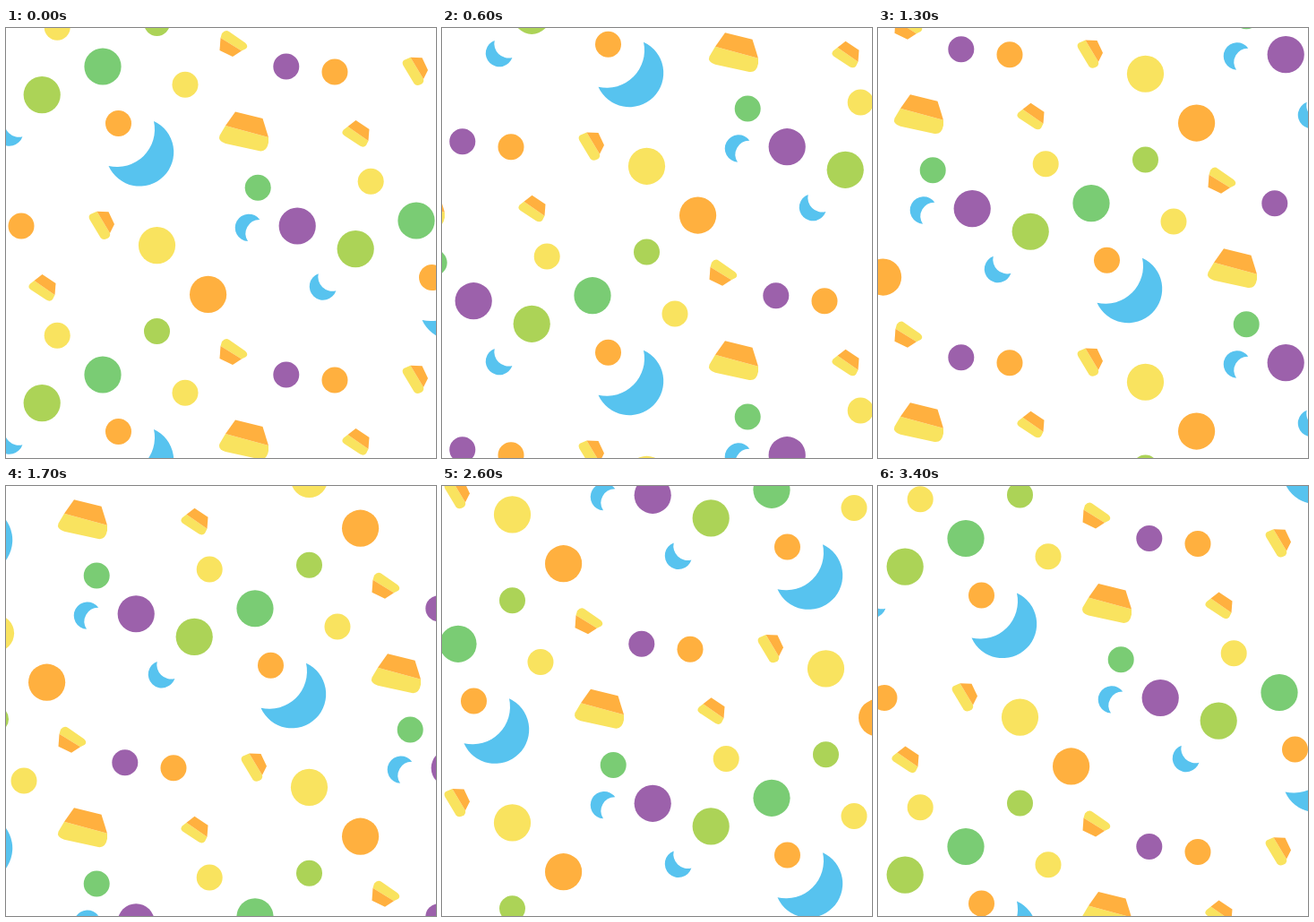
An HTML page that plays this animation: 480 by 480 pixels, repeating every 3500 ms.

```html
<!DOCTYPE html>
<html lang="en">
<head>
<meta charset="utf-8">
<title>Drifting sweets</title>
<style>
  html, body { margin: 0; width: 100%; height: 100%; overflow: hidden; background: #fff; }
  svg { display: block; width: 100%; height: 100%; }
</style>
</head>
<body>
<svg viewBox="0 0 480 480">
  <defs><g id="motif"></g></defs>
  <g id="field"></g>
</svg>
<script>
const GREEN = '#7acc74', LIME = '#acd357', YELLOW = '#f9e35f';
const ORANGE = '#ffb03f', PURPLE = '#9c61ab', BLUE = '#57c3ef';
const TILE_W = 350, TILE_H = 344;
const STEP_MS = 100, STEPS = 35, STEP_X = 10, STEP_Y = 14.72;
const BIG = 20.6, SMALL = 14.5;

const motif = document.getElementById('motif');
const field = document.getElementById('field');

function add(parent, tag, attrs) {
  const el = document.createElementNS('http://www.w3.org/2000/svg', tag);
  for (const key in attrs) el.setAttribute(key, attrs[key]);
  parent.appendChild(el);
}

const dot = (cx, cy, r, fill) => add(motif, 'circle', { cx, cy, r, fill });
const shape = (fill, d) => add(motif, 'path', { d, fill });

// Crescent between two tips: long outer arc out, shallow inner arc back.
function moon(x1, y1, x2, y2, outer, inner) {
  shape(BLUE, `M${x1} ${y1}A${outer} ${outer} 0 1 1 ${x2} ${y2}A${inner} ${inner} 0 0 0 ${x1} ${y1}z`);
}

function candy(top, base) {
  shape(YELLOW, base);
  shape(ORANGE, top);
}

dot(108, 43, BIG, GREEN);
dot(40.2, 74.6, BIG, LIME);
dot(168.5, 242.6, BIG, YELLOW);
dot(225.6, 297.4, BIG, ORANGE);
dot(325.2, 221, BIG, PURPLE);

dot(57.2, 343.2, SMALL, YELLOW);
dot(200, 63.3, SMALL, YELLOW);
dot(168.5, 338.4, SMALL, LIME);
dot(125.5, 106.6, SMALL, ORANGE);
dot(367, 49, SMALL, ORANGE);
dot(312.8, 43, SMALL, PURPLE);
dot(281.2, 178.2, SMALL, GREEN);

moon(165, 104, 114.5, 154, 38, 42);
moon(270, 238, 283.3, 214, 15.2, 15.5);
moon(368.4, 293.2, 348.7, 274.2, 15.2, 16);

candy('M256 93.5L286.5 101L293 122L245 109z',
      'M245 109L293 122L293 128Q291 138.5 283 137.3L245 129Q236 126 238.5 120z');
candy('M239.5 11L263 25.5L253 32L238.5 25z',
      'M239.5 11L241 6Q245 1 249 4L267 16.5Q271 20 268 23L263 25.5z');
candy('M101.5 204.8L114.5 205.3L121 219L116 229z',
      'M101.5 204.8L116 229Q117 233 113 235Q108 237.5 105.5 234L93.5 214Q91.5 210 94 208z');
candy('M40.5 275L55.5 285L54.5 298L31.5 282z',
      'M31.5 282L54.5 298L52 303Q49 306 45 303.5L27.5 292Q23.5 289 27 285.5z');

// Half-drop repeat: every other column sits half a tile lower.
for (let col = -2; col <= 2; col++) {
  for (let row = -1; row <= 3; row++) {
    add(field, 'use', {
      href: '#motif',
      x: col * TILE_W,
      y: (row + Math.abs(col % 2) / 2) * TILE_H
    });
  }
}

function draw(ms) {
  const step = Math.floor(ms / STEP_MS) % STEPS;
  const y = -(step * STEP_Y % TILE_H);
  field.setAttribute('transform', `translate(${step * STEP_X} ${y})`);
}

let start;
function tick(now) {
  start ??= now;
  draw(now - start);
  requestAnimationFrame(tick);
}
draw(0);
requestAnimationFrame(tick);
</script>
</body>
</html>
```
